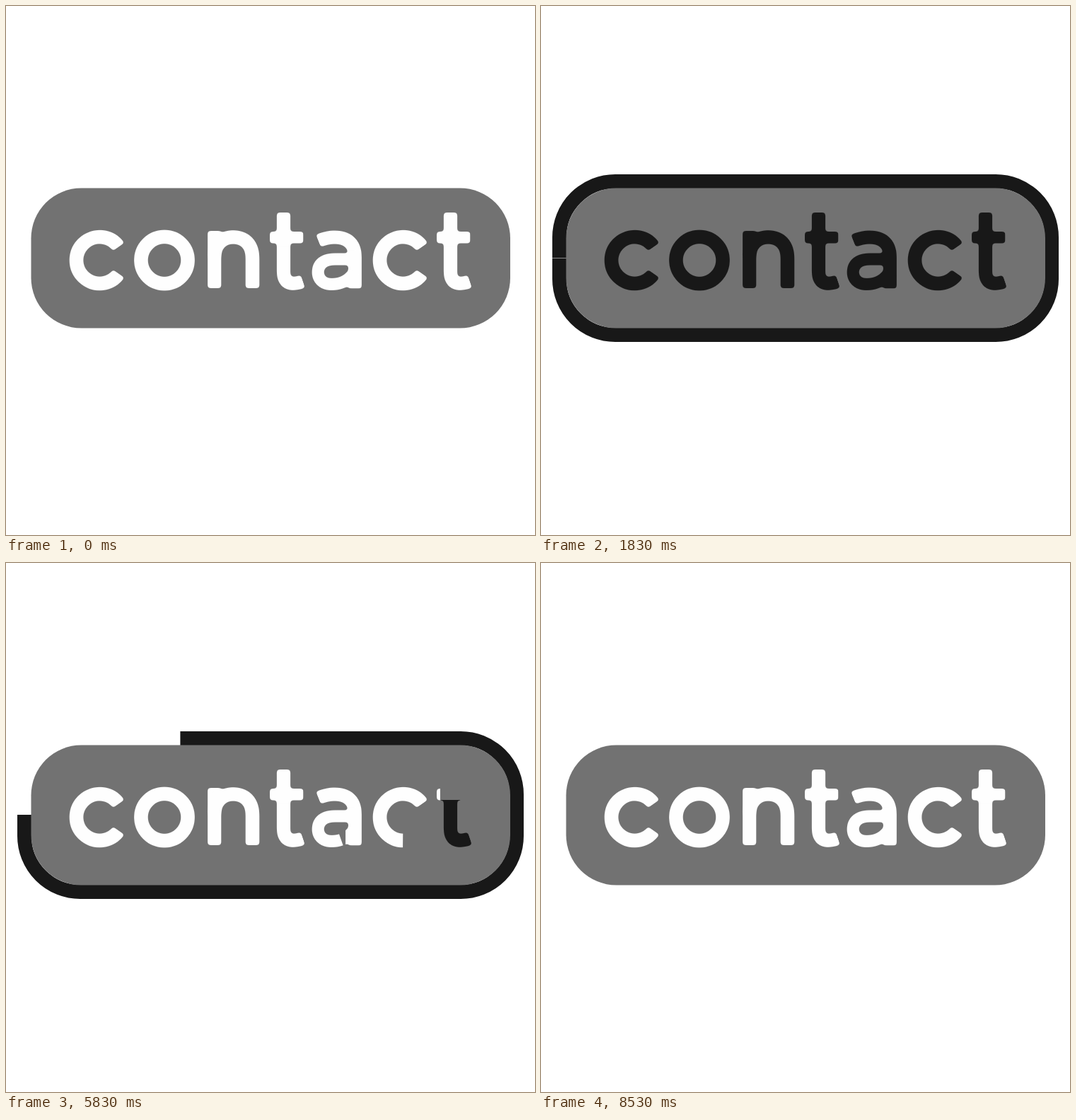
An HTML page for the animation above (8830 ms loop, 748 px wide and 748 px high).

```html
<!DOCTYPE html>
<html lang="en">
<head>
<meta charset="utf-8">
<title>contact</title>
<style>
  html, body { margin: 0; width: 100%; height: 100%; overflow: hidden; background: #fff; }
  svg { display: block; width: 100vw; height: 100vh; }
  path { fill: none; }
</style>
</head>
<body>
<svg viewBox="0 0 748 748" role="img" aria-label="contact">
  <defs>
    <!-- softens the corners of the lettering -->
    <filter id="soften" filterUnits="userSpaceOnUse" x="60" y="270" width="630" height="160">
      <feGaussianBlur stdDeviation="2.2"/>
      <feComponentTransfer><feFuncA type="linear" slope="5.5" intercept="-2.25"/></feComponentTransfer>
    </filter>
    <mask id="word" maskUnits="userSpaceOnUse" x="60" y="270" width="630" height="160">
      <g id="glyphs" filter="url(#soften)" stroke="#fff"></g>
    </mask>
  </defs>
  <path id="border" pathLength="1" stroke="#181818" stroke-width="20"
    d="M26 356V327A79 79 0 0 1 105 248H643A79 79 0 0 1 722 327V386A79 79 0 0 1 643 465H105A79 79 0 0 1 26 386Z"/>
  <rect x="35.5" y="257.5" width="677.5" height="198" rx="71" fill="#727272"/>
  <g mask="url(#word)"><g id="old"></g><g id="fresh"></g></g>
</svg>
<script>
const LOOP = 8830, BACK = 5000, DARK = '#181818', LIGHT = '#fefefe';
const $ = id => document.getElementById(id);

// Stroke: path, width, then [clear, draw] delays in ms for darkening and for lightening
const C = [['M159.5 340.6A33 33 0 1 0 159.5 378.4', 19.6, [0, 150], [0, 150]]];
const O = [['M224 326.3A33.2 33.2 0 0 1 224 392.7A33.2 33.2 0 0 1 224 326.3', 19.6, [0, 150], [0, 152]]];
const N = [
  ['M294.7 318V399', 19.2, [0, 150], [5, 158]],
  ['M294.7 354C294.7 337 306 326.7 321 326.7C338 326.7 348.5 337 348.5 356V399', 19.6, [100, 367], [-30, 260]]
];
const T = [
  ['M392.5 292V376C392.5 388 398 392.3 406 392.3C411 392.3 415.5 391 420 389.5', 19.2, [0, 168], [130, 280]],
  ['M373 327.2H420.5', 16.4, [60, 220], [-22, 180]]
];
const A = [
  ['M441.5 332C449 329 457 327 464.5 327C483 327 493.5 336 493.5 354V399.5', 18.8, [0, 55], [30, 180]],
  ['M493.5 358H464C449 358 441 365 441 376.5C441 388 450 393.5 460 393.5C474 393.5 486 387 493 376', 17, [-22, 200], [30, 250]]
];
const letters = [[C, 0], [O, 0], [N, 0], [T, 0], [A, 0], [C, 429], [T, 236]];

function addPath(parent, d, width, dx) {
  const p = document.createElementNS('http://www.w3.org/2000/svg', 'path');
  const attrs = { d, 'stroke-width': width, transform: `translate(${dx})`, pathLength: 1 };
  for (const k in attrs) p.setAttribute(k, attrs[k]);
  return parent.appendChild(p);
}

const strokes = letters.flatMap(([parts, dx], index) => parts.map(([d, width, darken, lighten]) => {
  addPath($('glyphs'), d, width, dx);
  return {
    index, darken, lighten,
    old: addPath($('old'), d, width + 8, dx),
    fresh: addPath($('fresh'), d, width + 8, dx)
  };
}));

const clamp = u => Math.min(1, Math.max(0, u));
const smooth = u => u * u * (3 - 2 * u);

// Bezier easing (.684, 0, .24, 1), solved by bisection
function glide(u) {
  if (u <= 0 || u >= 1) return clamp(u);
  let lo = 0, hi = 1;
  for (let i = 0; i < 24; i++) {
    const s = (lo + hi) / 2, r = 1 - s;
    if (3 * r * r * s * .684 + 3 * r * s * s * .24 + s ** 3 < u) lo = s; else hi = s;
  }
  return smooth(lo);
}

function trim(path, from, to) {
  path.style.visibility = to - from > 1e-4 ? 'visible' : 'hidden';
  path.style.strokeDasharray = `0 ${from} ${to - from + (to === 1 ? .01 : 0)} 3`;
}

function render(ms) {
  // the picture steps at 0 and 30 ms of every tenth of a second
  const t = Math.floor(ms / 100) * 100 + (ms % 100 >= 30 ? 30 : 0);
  const back = t >= BACK, time = back ? t - BACK : t;
  const edge = glide((time - (back ? 200 : 70)) / 1800);
  trim($('border'), back ? edge : 0, back ? 1 : edge);

  const stagger = back ? 100 : 180, span = back ? 250 : 240;
  $('old').setAttribute('stroke', back ? DARK : LIGHT);
  $('fresh').setAttribute('stroke', back ? LIGHT : DARK);
  for (const s of strokes) {
    const [clear, draw] = back ? s.lighten : s.darken;
    const part = delay => smooth(clamp((time - s.index * stagger - delay) / span));
    trim(s.old, part(clear), 1);
    trim(s.fresh, 0, part(draw));
  }
}

const start = performance.now();
function frame() {
  render((performance.now() - start) % LOOP);
  requestAnimationFrame(frame);
}
frame();
</script>
</body>
</html>
```
